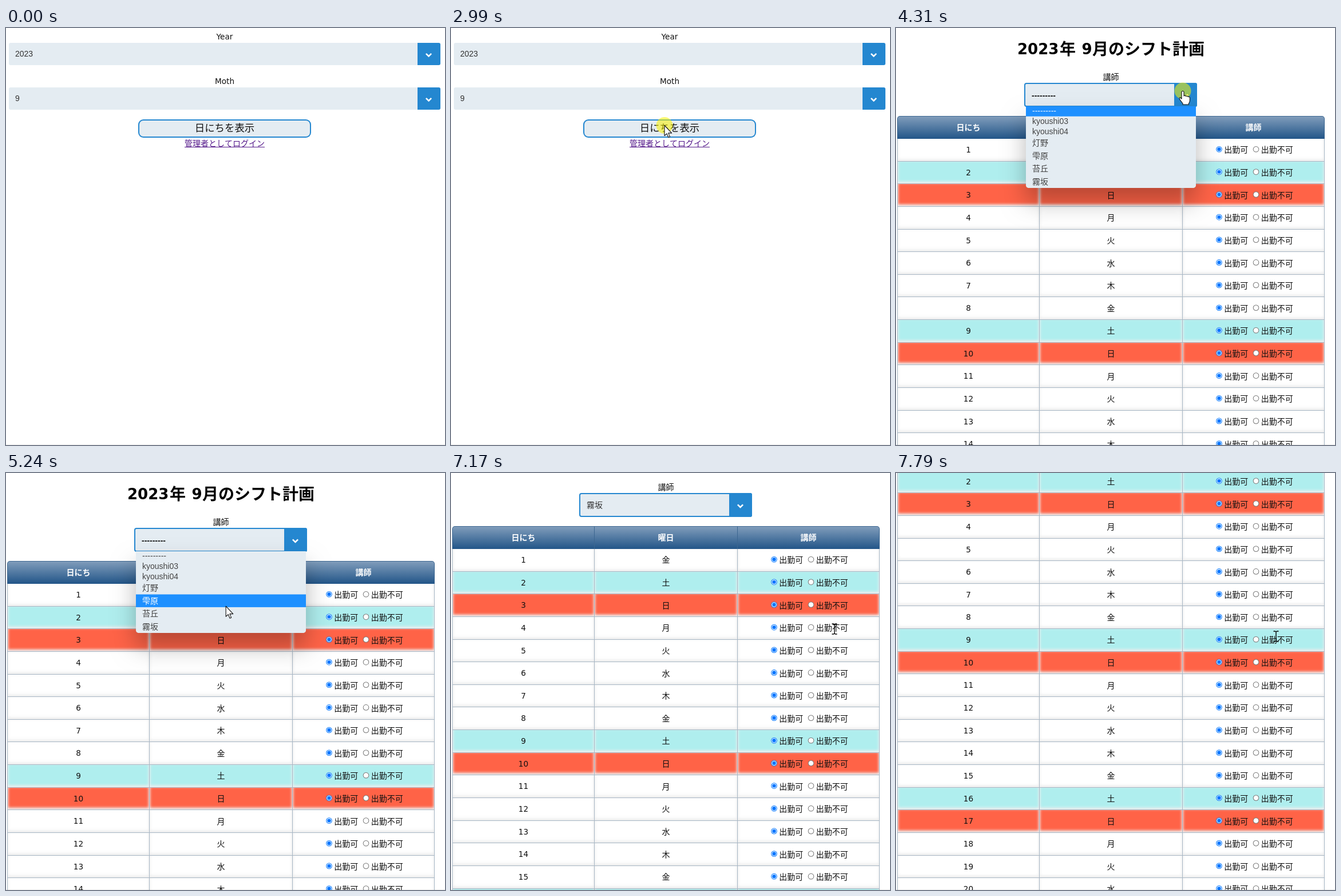
Recreate the animation shown at these times as an HTML page with a canvas. Size 767 by 730 pixels, loop 8000 ms.

```html
<!DOCTYPE html>
<html lang="ja">
<head>
<meta charset="utf-8">
<title>シフト計画</title>
<style>
  html, body { margin: 0; width: 100%; height: 100%; overflow: hidden; background: #fff; }
  canvas { display: block; }
</style>
</head>
<body>
<canvas id="stage" width="767" height="730"></canvas>
<script>
const ctx = document.getElementById('stage').getContext('2d');
const W = 767, H = 730, LOOP = 8000;
const FIRST = 975, STEP = 77.386;       // the screen refreshes about 13 times a second
const BLUE = '#2487d0', FIELD = '#e4ecf2', GRID = '#a8b7c5', INK = '#111';
const CJK = '"Noto Sans CJK JP", "Noto Sans CJK", sans-serif';
const WIDE = '"DejaVu Sans", sans-serif';
const PLAIN = '"Liberation Sans", Arial, sans-serif';

// Refresh numbers of the main events
const SUBMIT = 26, LOADED = 28, OPEN = 43, PICK = 64, CLOSED = 65, OVER_TEXT = 77;

// Pointer glides; `via` bends the path
const ENTRY = [716, 252];
const GLIDES = [
  { from: 0, until: 9, to: [379, 163], via: [492, -91] },
  { from: 11, until: 17, to: [373, 170.5] },
  { from: 35, until: 42, to: [501, 110] },
  { from: 46, until: 57, to: [373, 245] },
  { from: 57, until: 60, to: [371, 264] },
  { from: 68, until: 78, to: [670, 273], via: [600, 145] },
  { from: 82, until: 85, to: [664, 286] }
];
const NOTCH = 79.3;                     // wheel notch in pixels

const OPTIONS = ['---------', 'kyoushi03', 'kyoushi04', '灯野', '雫原', '苔丘', '霧坂'];
const COLUMNS = [2, 250, 500, 749];
const ROW_TOP = 194, ROW_H = 39.64;

const ARROW = new Path2D('M0 0V18L4.1 14.4L6.9 21L9.5 19.9L6.7 13.4H12.6Z');
const HAND = new Path2D('M-2 2Q0 -1.5 2 2V9Q4 7 5.6 9.6Q7.8 8 9.2 10.6Q11.5 9.4 12.4 12V17' +
  'Q12.2 20 10.4 22V24H0V22Q-2.5 19 -5.6 14.5Q-6.6 11.4 -4 12L-2 14Z');
const IBEAM = new Path2D('M-4.5 -9H-1.5L0 -8L1.5 -9H4.5M0 -8V8M-4.5 9H-1.5L0 8L1.5 9H4.5');

const progress = (at, from, until) => Math.min(1, Math.max(0, (at - from) / (until - from)));
const smooth = p => p * p * (3 - 2 * p);
const easeOut = p => 1 - (1 - p) ** (4 / 3);
const center = column => 126.5 + 249 * column;
const optionTop = i => 137 + 17.7 * Math.min(i, 3) + 22.4 * Math.max(0, i - 3);

function pointerAt(tick) {
  let pos = ENTRY;
  for (const { from, until, to, via } of GLIDES) {
    if (tick < from) break;
    const p = smooth(progress(tick, from, until)), q = 1 - p;
    pos = pos.map((v, i) => {
      const bend = via ? via[i] : (v + to[i]) / 2;
      return q * q * v + 2 * q * p * bend + p * p * to[i];
    });
  }
  return pos;
}

function scrollAt(tick) {
  const notches = easeOut(progress(tick, 78, 81)) + 2 * smooth(progress(tick, 85, 88));
  return Math.ceil(NOTCH * notches);
}

function text(str, x, y, font, color = INK, align = 'center') {
  ctx.font = font;
  ctx.fillStyle = color;
  ctx.textAlign = align;
  ctx.fillText(str, x, y);
}

// Ideographs are placed by the middle of their em box
function kanji(str, x, mid, size = 14, color = INK, align = 'center', weight = 350) {
  text(str, x, mid + size * 0.38, `${weight} ${size}px ${CJK}`, color, align);
}

function box(x, y, w, h, r, fill) {
  ctx.beginPath();
  ctx.roundRect(x, y, w, h, r);
  ctx.fillStyle = fill;
  ctx.fill();
}

function rect(x, y, w, h, fill) {
  ctx.fillStyle = fill;
  ctx.fillRect(x, y, w, h);
}

function disc(x, y, r, fill) {
  ctx.beginPath();
  ctx.arc(x, y, r, 0, Math.PI * 2);
  ctx.fillStyle = fill;
  ctx.fill();
}

function line(path, color, width) {
  ctx.strokeStyle = color;
  ctx.lineWidth = width;
  ctx.stroke(path);
}

function frame(x, y, w, h, r) {
  box(x, y, w, h, r, BLUE);
  box(x + 2, y + 2, w - 4, h - 4, r - 2, FIELD);
}

function arrowBox(x, y, h) {
  box(x, y, 40, h, [0, 3, 3, 0], BLUE);
  const cx = x + 19.5, cy = y + h / 2 + 1.7;
  line(new Path2D(`M${cx - 4.6} ${cy - 2.3}l4.6 4.6l4.6 -4.6`), '#fff', 2.6);
}

function wideSelect(y, label, value) {
  text(label, 382, y - 6.2, `13.6px ${WIDE}`);
  box(5, y, 754, 39, 3, FIELD);
  arrowBox(719, y, 39);
  text(value, 16, y + 24, `14px ${PLAIN}`, '#333', 'left');
}

function drawForm() {
  wideSelect(26, 'Year', '2023');
  wideSelect(104, 'Moth', '9');
  frame(231, 160, 302, 32, 9);
  kanji('日にちを表示', 382, 174, 17.4);
  kanji('管理者としてログイン', 382, 201.5, 14, '#551a8b');
  rect(312, 208, 140, 1, '#551a8b');
}

function drawTitle() {
  const digits = `bold 26px ${WIDE}`;
  text('2023', 212, 45.5, digits, '#000', 'left');
  kanji('年', 286, 36, 28, '#000', 'left', 700);
  text('9', 324.5, 45.5, digits, '#000', 'left');
  kanji('月のシフト計画', 343, 36, 28, '#000', 'left', 700);
}

function drawSelect(picked) {
  kanji('講師', 375.5, 85.5);
  frame(224, 96, 302, 42, 4);
  arrowBox(486, 96, 42);
  if (picked) kanji(OPTIONS[6], 237, 117, 14, '#333', 'left');
  else text(OPTIONS[0], 237, 122.5, `bold 14px ${PLAIN}`, INK, 'left');
}

function drawHead() {
  const shade = ctx.createLinearGradient(0, 154, 0, 194);
  shade.addColorStop(0, '#829ebc');
  shade.addColorStop(1, '#225588');
  box(2, 154, 747, 40, [5, 5, 0, 0], '#3c6690');
  box(3, 155, 745, 39, [4, 4, 0, 0], shade);
  ['日にち', '曜日', '講師'].forEach((label, i) => {
    if (i) rect(COLUMNS[i], 154, 1, 40, '#3c6690');
    kanji(label, center(i), 173.3, 14, '#fff', 'center', 700);
  });
}

// Cell with a soft inner shadow, cast by a ring that lies off the stage
function drawCell(x, y, w, h, fill) {
  const away = 2000;
  ctx.save();
  ctx.beginPath();
  ctx.rect(x, y, w, h);
  ctx.clip();
  rect(x, y, w, h, fill);
  ctx.beginPath();
  ctx.rect(x - 20 - away, y - 20, w + 40, h + 40);
  ctx.rect(x + 0.8 - away, y - 1.6, w - 1.6, h - 1.6);
  ctx.shadowColor = '#eee';
  ctx.shadowBlur = 4;
  ctx.shadowOffsetX = away;
  ctx.fill('evenodd');
  ctx.restore();
}

function drawRadio(x, y, label, on) {
  const color = on ? '#0075ff' : '#767676';
  disc(x, y - 0.8, 5.3, color);
  disc(x, y - 0.8, 4.3, '#fff');
  if (on) disc(x, y - 0.8, 3.2, color);
  kanji(label, x + 8.8, y, 14, INK, 'left');
}

function drawRow(day) {
  const top = ROW_TOP + (day - 1) * ROW_H, mid = top + 19;
  const y = Math.round(top), h = Math.round(top + ROW_H) - y;
  const name = '金土日月火水木'[(day - 1) % 7];
  const fill = { 土: '#afeeee', 日: '#ff6347' }[name] || '#fff';
  rect(2, y, 747, h, GRID);
  for (let i = 0; i < 3; i++) {
    const x = COLUMNS[i] + 1;
    drawCell(x, y, Math.min(748, COLUMNS[i + 1]) - x, h - 1, fill);
  }
  text(day, center(0), mid + 5, `13.6px ${WIDE}`);
  kanji(name, center(1), mid);
  drawRadio(564.5, mid, '出勤可', true);
  drawRadio(629, mid, '出勤不可', false);
}

function drawList(pointerY) {
  const outline = () => box(227, 137, 297, 143, [0, 0, 5, 5], FIELD);
  ctx.save();
  ctx.shadowColor = 'rgba(0,0,0,.28)';
  ctx.shadowBlur = 40;
  ctx.shadowOffsetY = 24;
  outline();
  ctx.restore();
  ctx.save();
  outline();
  ctx.clip();
  const active = Math.max(0, OPTIONS.findLastIndex((_, i) => pointerY >= optionTop(i)));
  OPTIONS.forEach((option, i) => {
    const top = optionTop(i), h = optionTop(i + 1) - top, mid = top + h / 2;
    const color = i === active ? '#fff' : '#444';
    if (i === active) rect(227, top, 297, h, '#1e90ff');
    if (i < 3) text(option, 238, mid + 4.4, `14px ${PLAIN}`, color, 'left');
    else kanji(option, 238, mid - 0.3, 14, color, 'left');
  });
  ctx.restore();
}

function drawSchedule(tick, pointerY) {
  const scroll = scrollAt(tick);
  ctx.save();
  ctx.translate(0, -scroll);
  drawTitle();
  drawSelect(tick >= CLOSED);
  drawHead();
  const last = Math.ceil((H + scroll - ROW_TOP) / ROW_H);
  for (let day = 1; day <= last; day++) drawRow(day);
  if (tick >= OPEN && tick < CLOSED) drawList(pointerY);
  ctx.restore();
}

function drawPointer(tick, x, y) {
  if ([SUBMIT, OPEN, PICK].includes(tick)) disc(x, y, 14.5, 'rgba(250,242,0,.55)');
  ctx.save();
  ctx.translate(x, y);
  ctx.lineJoin = 'round';
  if (tick >= OVER_TEXT) {
    line(IBEAM, '#000', 1.4);
  } else {
    const shape = tick >= LOADED && y < 137 ? HAND : ARROW;
    ctx.fillStyle = '#fff';
    ctx.fill(shape);
    line(shape, INK, 1.1);
  }
  ctx.restore();
}

function draw(tick) {
  const [x, y] = pointerAt(tick);
  rect(0, 0, W, H, '#fff');
  if (tick < LOADED) drawForm();
  else drawSchedule(tick, y);
  rect(0, 729, W, 1, 'rgba(0,0,0,.07)');
  if (tick >= 0) drawPointer(tick, x, y);
}

let shown = null;
const start = performance.now();
function loop() {
  const t = (performance.now() - start) % LOOP;
  const tick = Math.max(-1, Math.floor((t - FIRST) / STEP));
  if (tick !== shown) draw(shown = tick);
  requestAnimationFrame(loop);
}
loop();
</script>
</body>
</html>
```
